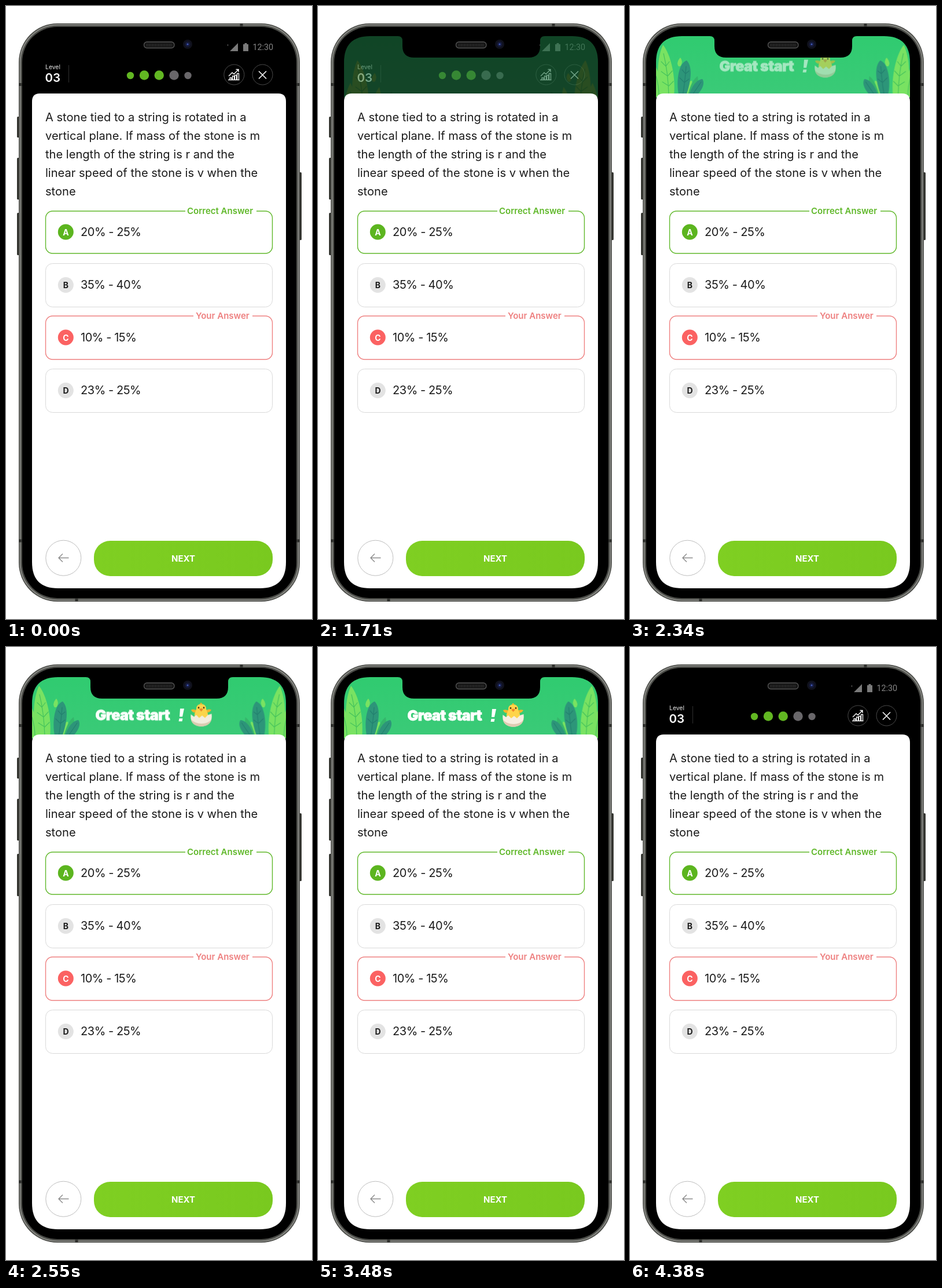
These frames come from a looping animation (529x1058 px, 4410 ms). An HTML page:

```html
<!DOCTYPE html>
<html lang="en">
<head>
<meta charset="utf-8">
<title>Quiz screen</title>
<style>
html, body { margin: 0; width: 100%; height: 100%; overflow: hidden; background: #fff; }
svg { display: block; width: 100vw; height: 100vh; font-family: Inter, "Open Sans", sans-serif; }
.body { font-size: 20.1px; fill: #1b1b1b; }
.opt { font-size: 20px; letter-spacing: -.45px; fill: #1b1b1b; }
.tag { font-size: 15px; font-weight: 600; }
.key { font-size: 14px; font-weight: 700; text-anchor: middle; }
.title { font-size: 25px; font-weight: 900; letter-spacing: -.6px; fill: #fff; stroke: #fff; stroke-width: .8; }
.light { fill: #79e262; }
.dark { fill: #2d9579; }
.vein { fill: none; stroke: #45c35c; stroke-width: 1.2; stroke-linecap: round; }
.dark + .vein { stroke: #23806f; }
</style>
</head>
<body>
<svg viewBox="0 0 529 1058">
  <defs>
    <clipPath id="top"><path d="M45 158V97Q45 52 90 52H138Q146 52 146 60V69Q146 89 166 89H364Q384 89 384 69V60Q384 52 392 52H439Q484 52 484 97V158Z"/></clipPath>
    <linearGradient id="sky" x2="0" y2="1"><stop stop-color="#30cb70"/><stop offset="1" stop-color="#3bca78"/></linearGradient>
    <linearGradient id="go"><stop stop-color="#7fcf22"/><stop offset="1" stop-color="#79c91f"/></linearGradient>
  </defs>

  <!-- phone -->
  <g fill="#33342f">
    <rect x="19" y="191" width="5" height="36" rx="1.5"/>
    <rect x="19" y="262" width="5" height="72" rx="1.5"/>
    <rect x="19" y="357" width="5" height="73" rx="1.5"/>
    <rect x="505" y="287" width="6" height="117" rx="1.5"/>
  </g>
  <rect x="22" y="30" width="486" height="998" rx="67" fill="#4b4c48"/>
  <rect x="24.5" y="32.5" width="481" height="993" rx="65" fill="none" stroke="#878883" stroke-width="2"/>
  <path d="M22 135.500H29M501 135.500H508M22 923H29M501 923H508M407 30V37M122 1021V1028" stroke="#30312e" stroke-width="5"/>
  <rect x="28" y="36" width="474" height="986" rx="61" fill="#000"/>

  <!-- status and level bar -->
  <g id="bar">
    <path d="M401 64V78H387ZM410 66H412.500V64H416.500V66H419V78H410Z" fill="#7a7a7a"/>
    <path d="M383.500 66V69" stroke="#666"/>
    <text x="426.500" y="76" font-family="Roboto, sans-serif" font-size="14.300" fill="#858585">12:30</text>
    <text x="68" y="109" font-size="10.400" fill="#e8e8e8">Level</text>
    <text x="67.500" y="131" font-size="20.500" font-weight="600" fill="#fff">03</text>
    <path d="M108.500 102V132" stroke="#2f2f2f"/>
    <g fill="#62b722">
      <circle cx="215" cy="120" r="6.200"/><circle cx="239" cy="119.500" r="8.200"/><circle cx="264.700" cy="119.500" r="8.200"/>
    </g>
    <g fill="#69676a"><circle cx="290.500" cy="119.500" r="8.200"/><circle cx="314.500" cy="120" r="6.200"/></g>
    <g fill="none" stroke="#4b4b4b"><circle cx="394.300" cy="118.500" r="17.500"/><circle cx="443.500" cy="118.500" r="17.500"/></g>
    <g fill="none" stroke="#fff" stroke-width="1.300">
      <path d="M437 112.500L450 125.500M450 112.500L437 125.500" stroke-width="1.600"/>
      <path d="M385 121L391 115L394 117.500L402 109.500M397.500 109.500H402V114M384 127.500H403.500M387 127V124H390V127M391.500 127V121H394.500V127M395.500 127V119.500H398.500V127M399.500 127V116.500H402.500V127"/>
    </g>
  </g>

  <!-- banner -->
  <g clip-path="url(#top)">
    <g id="banner">
      <rect x="45" y="52" width="440" height="106" fill="url(#sky)"/>
      <g id="plants">
        <g class="sway">
          <path class="light" d="M85 157Q81 132 95 113Q99 128 98 137Q103 128 107 129Q110 142 104 157Z"/>
          <path d="M99 157Q106 128 117 121Q120 138 114 157Z" fill="#35b66b"/>
          <path class="light" d="M57 67C66 77 80 112 76 157H53C46 126 46 92 57 67Z"/>
          <path class="vein" d="M58 82Q66 115 67 155M62 104L54 96M65 121L54 113M67 138L56 131M62 104L68 96M65 121L73 112M67 138L75 130"/>
          <path class="light" d="M32 157Q35 125 45 106Q58 130 57 157Z"/>
          <path class="vein" d="M45 121Q50 138 50 155"/>
          <path class="light" d="M87 89Q92 95 88 103Q83 107 82 99Q83 93 87 89Z"/>
        </g>
        <g class="rise">
          <path class="dark" d="M98 94C108 104 107 128 96 157H85C79 133 83 99 98 94Z"/>
          <path class="vein" d="M97 104Q95 132 91 155M96 117L90 110M94 132L86 124M96 117L102 112M94 132L102 126"/>
          <path class="dark" d="M125 126C131 134 123 148 112 157H101C105 142 113 128 125 126Z"/>
          <path class="vein" d="M123 131Q115 143 108 153"/>
        </g>
      </g>
      <g id="praise">
        <text class="title" x="154.500" y="127">Great start</text>
        <path d="M301 107H308L305 121H300ZM299.500 124H305.500L304.500 129H298.500Z" fill="#fff"/>
        <path d="M328 114Q321 114 320 109Q326 107 331 111ZM346 114Q353 114 355 109Q349 107 343 111Z" fill="#f2b62c"/>
        <path d="M326 126V116Q328 111 329 108C328 96 347 96 346 108Q347 111 349 116V126Z" fill="#ffd44a"/>
        <path d="M336 100Q335 97 337 97Q339 97 339 100Z" fill="#f2b62c"/>
        <path d="M334 108L337.500 106.500L341 108L337.500 112Z" fill="#f0832a"/>
        <circle cx="333" cy="105.500" r="1.400" fill="#4a2d18"/><circle cx="342" cy="105.500" r="1.400" fill="#4a2d18"/>
        <path d="M319.500 117L325 121L329 118L334 123L339 119L344 123L349 118L355.500 116Q358 136 337.500 138Q317 136 319.500 117Z" fill="#f7eee0"/>
        <path d="M320 126Q327 133 338 133Q350 133 355.500 125Q353 137 337.500 138Q322 137 320 126Z" fill="#dfcbb2"/>
      </g>
    </g>
  </g>

  <!-- speaker and camera -->
  <rect x="238.500" y="62" width="52.500" height="10.500" rx="5" fill="#151515" stroke="#555" stroke-width="1.300"/>
  <path d="M243 67.500H287" stroke="#303030" stroke-width="5" stroke-dasharray="1 1.500"/>
  <circle cx="314" cy="66" r="8" fill="#10111c"/><circle cx="314" cy="66" r="4.500" fill="#151a3c"/><circle cx="314" cy="66" r="1.600" fill="#4057b5"/>

  <!-- question card -->
  <path d="M45 165Q45 151 58 151H471Q484 151 484 165V960Q484 1005 439 1005H90Q45 1005 45 960Z" fill="#fff"/>
  <g id="question" class="body"></g>
  <g id="options"></g>
  <circle cx="99.300" cy="952.700" r="30.500" fill="#fff" stroke="#bdbdbd"/>
  <path d="M108.500 952.500H91M98 945.500L91 952.500L98 959.500" fill="none" stroke="#8b8b8b" stroke-width="1.400"/>
  <rect x="152" y="923" width="309" height="61" rx="28" fill="url(#go)"/>
  <text x="306.500" y="959" text-anchor="middle" font-size="15" font-weight="700" fill="#fff">NEXT</text>
</svg>
<script>
const LOOP = 4410;
const $ = id => document.getElementById(id);

function add(parent, tag, attrs, text) {
  const el = document.createElementNS("http://www.w3.org/2000/svg", tag);
  for (const k in attrs) el.setAttribute(k, attrs[k]);
  if (text) el.textContent = text;
  parent.append(el);
  return el;
}

["A stone tied to a string is rotated in a",
 "vertical plane. If mass of the stone is m",
 "the length of the string is r and the",
 "linear speed of the stone is v when the",
 "stone"
].forEach((line, i) => add($("question"), "text", { x: 68, y: 198.5 + 32 * i }, line));

const options = [
  { key: "A", text: "20% - 25%", y: 354, h: 73, color: "#60b82a", dot: "#5cb51f", tag: "Correct Answer", gap: [310, 433], tagX: 313 },
  { key: "B", text: "35% - 40%", y: 444.5, h: 75 },
  { key: "C", text: "10% - 15%", y: 535, h: 75, color: "#ee8080", dot: "#fb6262", tag: "Your Answer", gap: [324, 426], tagX: 328 },
  { key: "D", text: "23% - 25%", y: 626.5, h: 75 }
];
for (const o of options) {
  const g = $("options"), mid = o.y + o.h / 2 - .5;
  add(g, "rect", { x: 68.5, y: o.y, width: 392, height: o.h, rx: 12, fill: "#fff",
    stroke: o.color || "#d9d9d9", "stroke-width": o.color ? 1.4 : 1 });
  add(g, "circle", { cx: 103.3, cy: mid, r: 13.5, fill: o.dot || "#e3e3e3" });
  add(g, "text", { class: "key", x: 103.5, y: mid + 5.5, fill: o.dot ? "#fff" : "#1b1b1b" }, o.key);
  add(g, "text", { class: "opt", x: 129, y: mid + 6.8 }, o.text);
  if (o.tag) {
    const [a, b] = o.gap;
    add(g, "rect", { x: a, y: o.y - 3, width: b - a, height: 6, fill: "#fff" });
    add(g, "text", { class: "tag", x: o.tagX, y: o.y + 4.5, fill: o.color }, o.tag);
  }
}

// the right-hand plants mirror the left
const twin = $("plants").cloneNode(true);
twin.removeAttribute("id");
twin.setAttribute("transform", "translate(530.5 0) scale(-1 1)");
$("plants").after(twin);

// each step: [time in ms, style, easing to the next step]
function play(el, steps) {
  const all = [[0, steps[0][1]], ...steps, [LOOP, steps[steps.length - 1][1]]];
  el.animate(all.map(([t, style, easing = "linear"]) => ({ offset: t / LOOP, easing, ...style })),
    { duration: LOOP, iterations: Infinity });
}
const slide = (x, y, opacity = 1) => ({ transform: `translate(${x}px, ${y}px)`, opacity });
const fade = opacity => ({ opacity });

play($("bar"), [
  [1650, fade(1), "ease-out"], [1860, fade(0)],
  [3540, fade(0), "ease-out"], [3870, fade(1)]
]);
play($("banner"), [
  [1650, fade(0), "ease-out"], [1920, fade(1)],
  [3500, fade(1), "ease-out"], [3780, fade(0)]
]);
document.querySelectorAll(".sway").forEach(el => play(el, [
  [1650, slide(11, 40), "ease-out"], [1930, slide(11, 0)],
  [2010, slide(11, 0), "ease-out"], [2310, slide(0, 0)],
  [3500, slide(0, 0)], [3780, slide(0, 0)]
]));
document.querySelectorAll(".rise").forEach(el => play(el, [
  [1970, slide(0, 62, 0), "ease-out"], [2310, slide(0, 0)],
  [3500, slide(0, 0)], [3780, slide(0, 0)]
]));
play($("praise"), [
  [2180, slide(0, -32, 0), "ease-out"], [2600, slide(0, 0)],
  [3500, slide(0, 0)], [3780, slide(0, 0)]
]);
</script>
</body>
</html>
```
